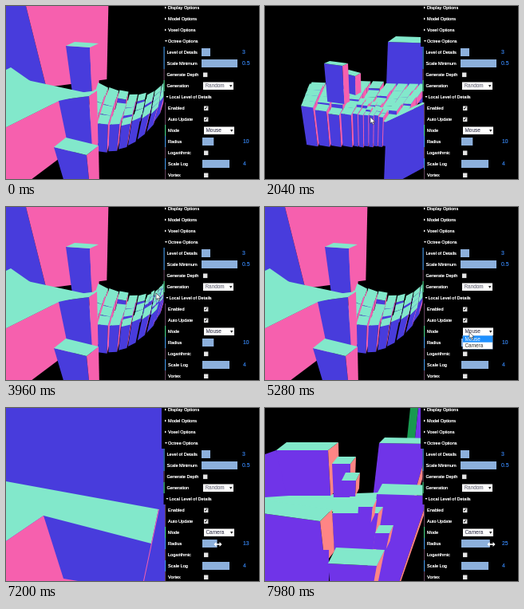
Write an HTML page with a canvas that moves like this. It is 317 px wide and 217 px high and loops after 8000 ms.

```html
<!DOCTYPE html>
<html lang="en">
<head>
<meta charset="utf-8">
<title>Voxel octree</title>
<style>
html, body { margin: 0; width: 100%; height: 100%; overflow: hidden; background: #000; }
canvas { display: block; }
</style>
</head>
<body>
<canvas id="stage" width="317" height="217"></canvas>
<script>
const ctx = document.getElementById('stage').getContext('2d');
const FONT = 'Arial, "Liberation Sans", sans-serif';
const LOOP = 8000, STEP = 60, ROW = 14;
const TEAL = '#82e8cb', BLUE = '#483cdc', PINK = '#f660ae', GREEN = '#189a50';
const COOL = [BLUE, PINK], WARM = ['#7034e8', '#ff8585'];
let skin = COOL, vanish = [0, 0], mouse = null;

const clamp = v => Math.min(1, Math.max(0, v));
const part = (t, a, b) => clamp((t - a) / (b - a));
const ease = p => p * p * (3 - 2 * p);
const mix = (a, b, p) => a + (b - a) * p;
const mixPoint = (a, b, p) => a.map((v, i) => mix(v, b[i], p));
const rnd = n => { const v = Math.sin(n * 127.1 + 3.7) * 43758.5; return v - Math.floor(v); };

function poly(color, ...points) {
  ctx.fillStyle = color;
  ctx.beginPath();
  points.forEach(p => ctx.lineTo(...p));
  ctx.fill();
}

function rect(color, x, y, w, h) {
  ctx.fillStyle = color;
  ctx.fillRect(x, y, w, h);
}

// Left, front and right corners of the top; upright edges meet at the vanishing point
function block(l, f, r, drop) {
  const sink = p => mixPoint(p, vanish, drop / (vanish[1] - p[1]));
  poly(skin[0], l, f, sink(f), sink(l));
  poly(skin[1], f, r, sink(r), sink(f));
  poly(TEAL, l, f, r, [l[0] + r[0] - f[0], l[1] + r[1] - f[1]]);
}

// A grid of blocks over a four-cornered patch; cells near the pointer split in four
function terrain({ back, front, sag, drop, cols, rows }) {
  const at = (c, r, lift = 0) => {
    const u = c / cols, v = r / rows, s = u * (1.3 - .3 * u);
    const [x, y] = mixPoint(mixPoint(back[0], back[1], s), mixPoint(front[0], front[1], s), v);
    return [x, y + sag * 4 * u * (1 - u) - lift];
  };
  const cell = (c, r, size, lift, h) =>
    block(at(c, r + size, lift), at(c + size * .86, r + size, lift), at(c + size * .86, r, lift), h + lift);
  for (let r = 0; r < rows; r++) {
    for (let c = 0; c < cols; c++) {
      const n = r * 31 + c, [x, y] = at(c + .5, r + .5);
      const lift = Math.floor(rnd(n) * 3) * 2.4;
      const h = r === rows - 1 ? drop * (1 - .4 * c / cols) : 8;
      if (mouse && Math.hypot(x - mouse[0], y - mouse[1]) < 18) {
        for (let k = 0; k < 4; k++) cell(c + (k % 2) / 2, r + (k >> 1) / 2, .5, lift + rnd(n + k * 9) * 3, h);
      } else cell(c, r, 1, lift, h);
    }
  }
}

function farView() {
  vanish = [140, 600];
  block([52, 48], [80, 52], [92, 46], 75);
  block([83, 66], [92, 68], [99, 64], 50);
  block([95, 80], [101, 82], [107, 78], 35);
  terrain({ back: [[92, 92], [206, 90]], front: [[78, 150], [190, 140]], sag: 11, drop: 38, cols: 9, rows: 5 });
  block([1, 120], [56, 134], [90, 108], 80);
  block([76, 124], [88, 128], [101, 119], 52);
}

function sideView() {
  vanish = [130, 700];
  block([154, 45], [215, 47], [225, 40], 75);
  terrain({ back: [[58, 96], [206, 98]], front: [[45, 130], [170, 148]], sag: 0, drop: 44, cols: 9, rows: 5 });
  block([152, 145], [210, 118], [225, 108], 85);
  block([98, 84], [113, 88], [120, 84], 24);
  block([74, 72], [97, 75], [104, 72], 48);
}

function nearView() {
  vanish = [120, 380];
  block([-80, -30], [20, -20], [129, -30], 122);
  block([75, 50], [105, 52], [116, 47], 62);
  terrain({ back: [[116, 95], [204, 88]], front: [[98, 148], [202, 112]], sag: 22, drop: 32, cols: 8, rows: 4 });
  block([58, 119], [104, 113], [114, 106], 66);
  block([-100, 130], [-40, 172], [66, 119], 63);
  poly(TEAL, [-80, 70], [106, 110], [66, 119], [-80, 192]);
  block([60, 177], [101, 187], [116, 175], 42);
}

function coarseView() {
  rect(BLUE, 0, 0, 203, 217);
  poly(TEAL, [0, 92], [191, 127], [182, 170], [47, 135], [0, 167]);
  poly(PINK, [0, 167], [47, 135], [72, 214], [90, 217], [0, 217]);
  poly(PINK, [191, 127], [192, 127], [173, 217], [172, 217]);
}

function fineView(detail) {
  skin = WARM;
  vanish = [100, 420];
  poly(WARM[0], [0, 58], [14, 53], [40, 115], [0, 115]);
  poly(GREEN, [182, 0], [192, 0], [188, 38], [178, 38]);
  poly(WARM[0], [192, 0], [203, 0], [203, 38], [188, 38]);
  block([143, 44], [205, 45], [212, 38], 70);
  poly(TEAL, [0, 112], [30, 110], [143, 106], [143, 130], [0, 130]);
  block([14, 53], [79, 53], [92, 43], 57);
  block([84, 70], [107, 70], [114, 61], 42);
  block([140, 108], [205, 110], [212, 97], 120);
  block([84, 132], [142, 132], [148, 124], 55);
  block([-40, 127], [69, 142], [84, 127], 53);
  rect(WARM[0], 0, 178, 80, 39);
  block([79, 195], [140, 198], [150, 178], 40);
  if (!detail) return;
  for (let i = 0; i < 3; i++) {
    const x = 96 + i * 21, y = 91 + i * 33;
    block([x, y], [x + 18, y], [x + 23, y - 10], 20);
  }
}

function zoomed(draw, sx, sy, x, y) {
  ctx.save();
  ctx.translate(x, y);
  ctx.scale(sx, sy);
  ctx.translate(-x, -y);
  draw();
  ctx.restore();
}

function scene(t, radius) {
  skin = COOL;
  const orbit = ease(part(t, 1320, 1800)), sway = ease(part(t, 2880, 3420)), zoom = part(t, 3420, 3900);
  if (t < 120 || (zoom === 1 && t < 5880)) nearView();
  else if (orbit < .5) zoomed(farView, 1 - orbit * .35, 1, 150, 130);
  else if (zoom < .5) zoomed(sideView, .8 + orbit * .2 + sway * .15 + zoom * 2, 1 + zoom * 2, 180, 130);
  else if (t < 5880) zoomed(nearView, .6 + zoom * .4, .6 + zoom * .4, 130, 110);
  else if (radius < 17) coarseView();
  else fineView(radius > 20);
}

function text(s, x, y, size = 5.6, color = '#fff', passes = 1) {
  ctx.font = `${size}px ${FONT}`;
  ctx.fillStyle = color;
  ctx.textBaseline = 'middle';
  while (passes--) ctx.fillText(s, x, y + .4);
}

const STRIPE = { number: '#3f8edb', choice: '#42c77e', check: '#5c3f56' };
const control = {
  folder(x, y, open) {
    if (open) poly('#fff', [x - 4, y - 1], [x - 1, y - 1], [x - 2.5, y + 1]);
    else poly('#fff', [x - 4, y - 1.5], [x - 2, y], [x - 4, y + 1.5]);
  },
  number(x, y, value, width) {
    rect('#8cb0dc', x, y - 5, width, 10);
    text(value, x + 51, y, 6.8, '#2f72cf', 2);
  },
  check(x, y, on) {
    rect('#e4e4e4', x + 2, y - 2.5, 5.4, 5.6);
    if (on) text('✓', x + 2.2, y, 6, '#222', 2);
  },
  choice(x, y, label, color) {
    rect('#fff', x + 2, y - 4.5, 38, 9.5);
    text(label, x + 4.5, y + .3, 6.4, color, 2);
    poly('#222', [x + 35, y - 1], [x + 38.4, y - 1], [x + 36.7, y + 2]);
  }
};

function panel(t, radius) {
  const rows = [
    ['Display Options', 'folder'], ['Model Options', 'folder'], ['Voxel Options', 'folder'],
    ['Octree Options', 'folder', true],
    ['Level of Details', 'number', '3', 11],
    ['Scale Minimum', 'number', '0.5', 45],
    ['Generate Depth', 'check', false],
    ['Generation', 'choice', 'Random', '#8a8a96'],
    ['Local Level of Details', 'folder', true],
    ['Enabled', 'check', true],
    ['Auto Update', 'check', true],
    ['Mode', 'choice', t < 5880 ? 'Mouse' : 'Camera', '#667'],
    ['Radius', 'number', String(Math.round(radius)), radius * 1.43],
    ['Logarithmic', 'check', false],
    ['Scale Log', 'number', '4', 34],
    ['Vortex', 'check', false]
  ];
  rows.forEach(([label, kind, ...args], i) => {
    const y = 2 + i * ROW, depth = i < 4 ? 0 : i < 9 ? 1 : 2;
    const edge = [195, 197.5, 199][depth], folder = kind === 'folder';
    rect('#000', edge, y - 7, 122, ROW);
    if (!folder) rect(STRIPE[kind], edge, y - 7, 1.2, ROW);
    const x = folder ? 203 + depth * 1.5 : 200 + depth * 1.5;
    text(label, x, y, 5.6, '#fff', 2);
    control[kind](folder ? x : 244 + depth, y, ...args);
  });
}

function dropdown(pick) {
  rect('#7aa6d8', 247.5, 161, 38, 17.5);
  rect('#fff', 248, 161.5, 37, 16.5);
  ['Mouse', 'Camera'].forEach((label, i) => {
    const y = 161.5 + i * 8.2;
    if (i === pick) rect('#1e90ff', 248, y, 37, 8.2);
    text(label, 250.5, y + 4.2, 6.4, i === pick ? '#fff' : '#333');
  });
}

function pointer([x, y], resize) {
  ctx.save();
  ctx.translate(x, y);
  if (resize) {
    rect('#fff', -3, -.8, 6, 1.6);
    for (const s of [-1, 1]) poly('#fff', [s * 5, 0], [s * 2, -3], [s * 2, 3]);
  } else {
    ctx.strokeStyle = '#222';
    poly('#fff', [0, 0], [0, 8], [2, 6.4], [3.3, 9.5], [4.7, 8.9], [3.4, 6], [6, 6]);
    ctx.lineWidth = .6;
    ctx.closePath();
    ctx.stroke();
  }
  ctx.restore();
}

// Circles over the terrain, then glides to the menu and drags the slider
function pointerAt(t, radius) {
  const a = (t - 1320) / 1560 * Math.PI;
  let p = [130 + 16 * Math.cos(a), 140 - 6 * Math.cos(a)];
  p = mixPoint(p, [188, 108], part(t, 3420, 3960));
  p = mixPoint(p, [256, 157], ease(part(t, 4320, 5100)));
  return mixPoint(p, [246 + radius * 1.5, 171], part(t, 5280, 5640));
}

function draw(now) {
  const t = Math.floor((now % LOOP) / STEP) * STEP;
  const radius = 10 + 15 * part(t, 7050, 7800);
  const spot = pointerAt(t, radius);
  mouse = t >= 120 && t < 5880 ? spot : null;
  rect('#000', 0, 0, 317, 217);
  scene(t, radius);
  panel(t, radius);
  if (t >= 5160 && t < 5880) dropdown(t < 5460 ? 0 : 1);
  if (t >= 120) pointer(spot, t >= 6060);
}

const start = performance.now();
function tick() {
  draw(performance.now() - start);
  requestAnimationFrame(tick);
}
tick();
</script>
</body>
</html>
```
